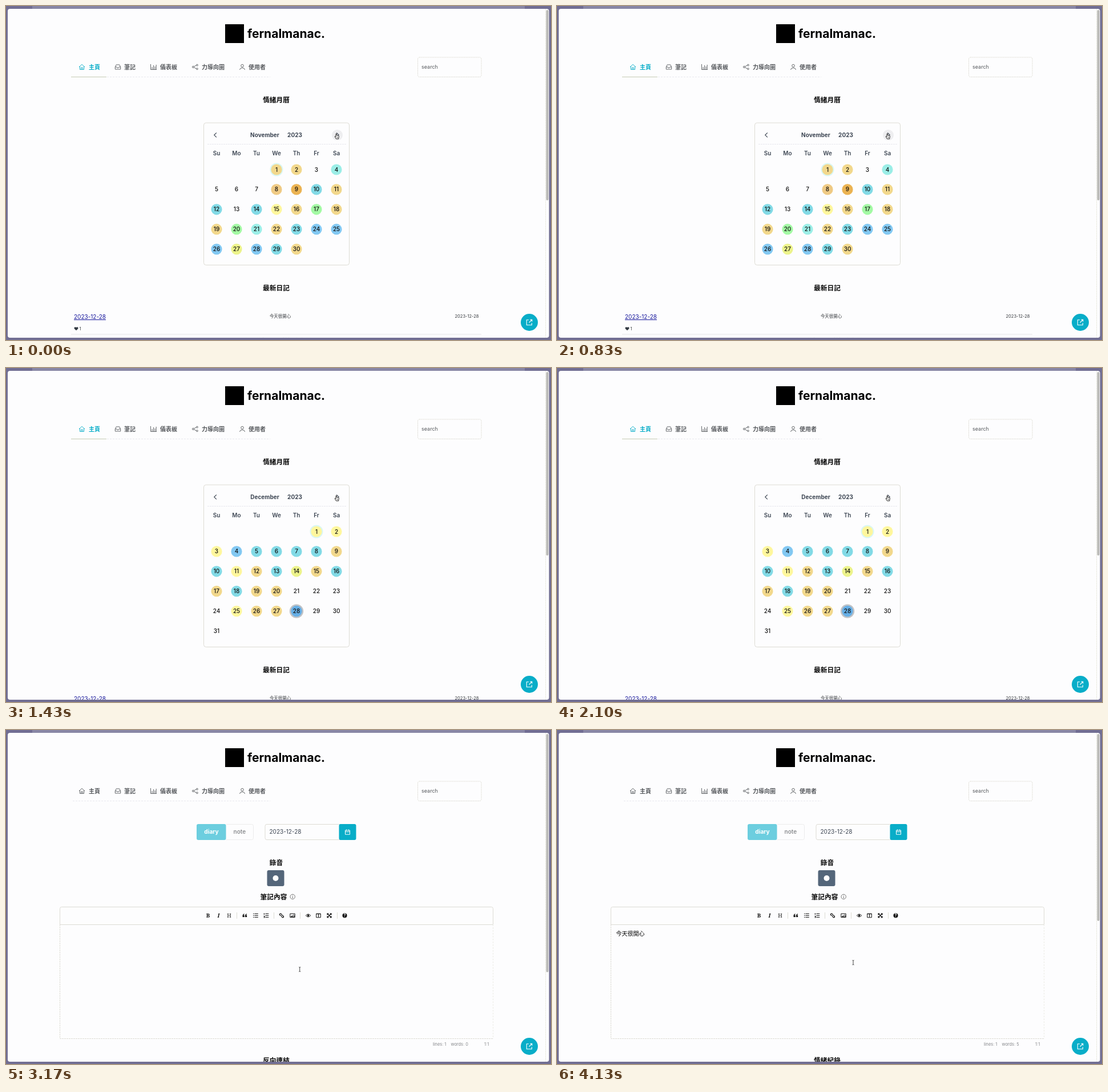
An HTML page for the animation above (4160 ms loop, 955 by 586 pixels).

```html
<!DOCTYPE html>
<html lang="zh-Hant">
<head>
<meta charset="utf-8">
<style>
html, body { margin: 0; width: 100%; height: 100%; overflow: hidden; background: #716e93; }
svg { display: block; }
text { font-family: Inter, "Noto Sans CJK TC", "Noto Sans CJK JP", "Noto Sans CJK", sans-serif; white-space: pre; }
.serif { font-family: "Noto Serif", "Liberation Serif", serif; }
</style>
</head>
<body>
<svg width="955" height="586" viewBox="0 0 955 586">
  <defs><clipPath id="win"><rect x="3" y="5" width="948.5" height="577" rx="4"/></clipPath></defs>
  <rect width="955" height="586" fill="#716e93"/>
  <rect x="46" width="863" height="5" fill="#8987a5"/>
  <rect x="3" y="5" width="948.5" height="577" rx="4" fill="#fdfdfe"/>
  <g id="page" clip-path="url(#win)"></g>
  <g id="cursor"></g>
</svg>
<script>
const LOOP = 4160, LEAVE = 1140, DECEMBER = 1370, EDITOR = 2930, FILLED = 3380;
const TEAL = '#08adc8', INK = '#3d4653', GREY = '#55585c', EDGE = '#dddcd4', FAINT = '#e8e8ee';
const page = document.getElementById('page'), cursor = document.getElementById('cursor');

const text = (x, y, s, size, fill = '#111', more = '') =>
  `<text x="${x}" y="${y}" font-size="${size}" fill="${fill}" ${more}>${s}</text>`;
const mid = (x, y, s, size, fill, weight = 400) =>
  text(x, y, s, size, fill, `text-anchor="middle" font-weight="${weight}"`);
const heading = (y, s) => mid(473.5, y, s, 11.7, '#080808', 700);
const box = (x, y, w, h, fill, more = '') =>
  `<rect x="${x}" y="${y}" width="${w}" height="${h}" fill="${fill}" ${more}/>`;
const disc = (x, y, r, fill) => `<circle cx="${x}" cy="${y}" r="${r}" fill="${fill}"/>`;
const line = (d, stroke, width = 1, fill = 'none', more = '') =>
  `<path d="${d}" fill="${fill}" stroke="${stroke}" stroke-width="${width}" ${more}/>`;
const at = (x, y, s) => `<g transform="translate(${x} ${y})">${s}</g>`;
const framed = (x, y, w, h, more = 'rx="3"') => box(x, y, w, h, 'none', `stroke="${EDGE}" ${more}`);

// Navigation icons, each drawn around its own centre
const NAV = [
  [133, 145, '主頁', 'M-5 0L0 -4.5L5 0M-3.6 -1V4.4H3.6V-1M-1.2 4.4V1H1.2V4.4'],
  [196, 207, '筆記', 'M-4.7 0L-2.7 -4H2.7L4.7 0V4H-4.7ZM-4.7 0H-1.8Q-1.5 1.7 0 1.7T1.8 0H4.7'],
  [258.5, 270, '儀表板', 'M-5 -5V4.5H5.5M-2.5 4V0M0 4V-3M2.5 4V-1M4.7 4V-4'],
  [331.5, 343, '力導向圖', 'M-2 -.8L2 -3M-2 .8L2 3M-5 0a1.5 1.5 0 1 0 3 0a1.5 1.5 0 1 0 -3 0M2 -3.3a1.4 1.4 0 1 0 2.8 0a1.4 1.4 0 1 0 -2.8 0M2 3.3a1.4 1.4 0 1 0 2.8 0a1.4 1.4 0 1 0 -2.8 0'],
  [414, 425, '使用者', 'M-2.3 -2.2a2.3 2.3 0 1 0 4.6 0a2.3 2.3 0 1 0 -4.6 0M-4.5 5Q-4.2 1.5 0 1.5T4.5 5'],
];

function shell(home) {
  const nav = NAV.map(([ix, tx, label, d], i) => {
    const color = home && !i ? TEAL : GREY;
    return at(ix, 107, line(d, color, .9)) + text(tx, 110.7, label, 10, color, 'font-weight="700"');
  }).join('');
  return box(384, 32, 33, 33, '#000') +
    text(423, 56, 'fernalmanac.', 21, '#000', 'font-weight="700"') +
    nav + line('M117 124.5H463', FAINT, 1, 'none', 'stroke-dasharray="3 2"') +
    (home ? line('M114 124.5H176', '#c5cbb4') : '') +
    framed(721.5, 90, 111.5, 34.5, 'rx="3" stroke-dasharray="2 1"') +
    text(728, 110.3, 'search', 9, GREY);
}

function frameParts(thumbEnd) {
  return line('M945.5 5V582', '#e6e6d9', 1, 'none', 'stroke-dasharray="2 1"') +
    box(946.5, 7, 4, thumbEnd - 7, '#b9b9b6', 'rx="2"') +
    disc(917, 555, 15, TEAL) +
    at(917, 555, line('M-1 -4.3H-4.7V4.7H4.3V1M1.3 -4.7H4.7V-1.3M4.5 -4.5L-.5 .5', '#fff', 1.1));
}

const MOODS = { o: '#f2d88c', O: '#ebb352', p: '#efca84', c: '#82dae6', a: '#9beee7',
  y: '#fff79d', g: '#a3faa4', l: '#ecf38b', b: '#82c8f2' };
const MONTHS = {
  November: { first: 3, days: 'oo-a---pOcoc-cyogoogaocbbblbco'.replace('bbblbco', 'bbblbco') },
  December: { first: 5, days: 'yyybccccocyoclococoo----yoob---' },
};

function calendar(name, hover) {
  const { first, days } = MONTHS[name];
  const nov = name === 'November';
  let s = framed(346.5, 205, 255, nov ? 249.5 : 284.5, 'rx="4"') +
    line('M353 242.5H596', FAINT, 1, 'none', 'stroke-dasharray="3 1"') +
    (nov ? disc(580.5, 226.5, 9.5, '#eeeef0') : '') +
    line('M368.8 222.3L364.8 226.3L368.8 230.3M579.2 222.3L583.2 226.3L579.2 230.3', INK, 1.2) +
    mid(453.5, 229.8, name, 10, INK, 700) + mid(506, 229.8, '2023', 10, INK, 700);
  ['Su', 'Mo', 'Tu', 'We', 'Th', 'Fr', 'Sa'].forEach((d, i) => s += mid(369 + 35 * i, 262, d, 10, INK, 600));
  [...days].forEach((mood, i) => {
    const cell = i + first, x = 369 + cell % 7 * 35, y = 287 + Math.floor(cell / 7) * 34.9;
    const chosen = !nov && i === 27;
    if (!i) s += disc(x, y, 11.5, '#d9f6f4');
    if (chosen) s += disc(x, y, 12.2, '#bfc2c7');
    if (mood !== '-') s += disc(x, y, 9.6, chosen ? '#66afe6' : MOODS[mood]);
    else if (cell === hover) s += disc(x, y, 11.7, '#efeff1');
    s += mid(x, y + 3.5, i + 1, 10, '#111', 500);
  });
  return s;
}

const ENTRIES = [
  ['28', '今天很開心', 1],
  ['27', '今天開始寫履歷了，對未來充滿希望！', 8],
  ['26', '心情很好聽 [[NumCrest School]] [[小葉]]', 8],
  ['25', '應該沒壞掉吧 [[個人專案]] 拜託不要壞掉', 7],
  ['20', '今天是在 [[NumCrest School]] 很重要的日子，很開心可以完成 Fern alman...', 8],
];
const HEART = 'M0 3.3L-3.2 .2C-4.4 -1.8 -1.7 -4 0 -1.8C1.7 -4 4.4 -1.8 3.2 .2Z';

function diaryList(shift) {
  const rows = ENTRIES.map(([day, note, likes], i) => {
    const date = '2023-12-' + day;
    return at(0, 42 * i,
      text(119, 299, date, 10, i === 2 ? '#4a1c82' : '#17179c', 'text-decoration="underline"') +
      mid(480.5, 297.2, note, 7.45, '#33363a') +
      text(828.5, 297, date, 7.5, '#33363a', 'text-anchor="end"') +
      at(123, 316, line(HEART, 'none', 0, '#333a42')) + text(128.5, 318.8, likes, 7.5, '#33363a') +
      line('M114 326H833', i === 4 ? '#dcddd0' : '#e5e5e6'));
  }).join('');
  return at(0, shift, heading(249, '最新日記') + rows + heading(538, '最新筆記') +
    mid(469.5, 586.5, '今天學習到很多新的東西，希望明天也可以繼續加油下去', 7.45, '#33363a') +
    text(828.5, 586.5, '2023-12-14', 7.5, '#33363a', 'text-anchor="end"'));
}

function toolbar() {
  const letter = (x, s, style) => text(x, 329, s, 9.5, '#111', `class="serif" text-anchor="middle" ${style}`);
  const icon = (x, d, width = 1.2, fill = 'none') => at(x, 325.5, line(d, '#111', width, fill));
  // Opening quotation mark: a round dot with a tail curling up
  const quote = 'M-3.8 .6Q-3.8 -2.4 -1.2 -2.9V-1.7Q-2.4 -1.3 -2.4 -.2H-.9V2.6H-3.8Z';
  return letter(354, 'B', 'font-weight="700"') + letter(372.5, 'I', 'font-style="italic" font-weight="600"') +
    letter(391, 'H', '') +
    line('M404.5 320V331M469.5 320V331M515.5 320V331M580.5 320V331', EDGE) +
    icon(418.5, quote, .3, '#111') + icon(422.9, quote, .3, '#111') +
    icon(437.5, 'M-4.5 -3H-3M-4.5 0H-3M-4.5 3H-3M-2 -3H4.3M-2 0H4.3M-2 3H4.3') +
    icon(456, 'M-3.6 -4V-1.5M-4.5 1H-3V3.5H-4.5M-1.5 -3H4.3M-1.5 0H4.3M-1.5 3H4.3') +
    icon(483, 'M-.3 .8L-3.4 -.8V-2.8L-1.5 -3.4L.8 -1.2M.3 -.6L3.4 1V3L1.6 3.5L-.6 1.4') +
    icon(502, 'M-4.2 -3.2H4.2V3.2H-4.2ZM-3 2.2L-1 .2L0 1L2 -1.2L3.3 .5V2.2Z', 1) +
    icon(529.5, 'M-4.2 0Q0 -5 4.2 0Q0 5 -4.2 0Z', 1) + disc(529.5, 325.5, 1.7, '#111') +
    icon(547.5, 'M-3.8 -3.2H3.8V3.4H-3.8ZM0 -3V3M-3.8 -2.8H3.8', 1) +
    icon(566.5, 'M-3 -3L3 3M3 -3L-3 3M-3.5 -1V-3.5H-1M1 -3.5H3.5V-1M3.5 1V3.5H1M-1 3.5H-3.5V1') +
    disc(593.5, 325.5, 4, '#111') + mid(593.5, 328.1, '?', 7, '#fff', 700);
}

function editor(filled) {
  return box(334, 165, 51.5, 28, '#6ccedf', 'rx="3"') + mid(360, 182.4, 'diary', 10.2, '#fff', 700) +
    line('M385.5 165.5H430.5Q433.5 165.5 433.5 168.5V189.5Q433.5 192.5 430.5 192.5H385.5', '#ececec') +
    mid(409.3, 182.2, 'note', 10, '#8b8d90', 600) +
    framed(454, 165.5, 135, 27) + text(461.5, 182.3, '2023-12-28', 10, INK) +
    box(583.5, 165, 30, 28, TEAL, 'rx="3"') +
    at(598.5, 179, line('M-4 -3H4V4.2H-4ZM-4 -.4H4M-2 -4.5V-2M2 -4.5V-2', '#fff', 1)) +
    heading(237, '錄音') + box(457.5, 246, 30, 28, '#54667a', 'rx="3"') + disc(472.5, 260, 5, '#fff') +
    mid(469, 296.7, '筆記內容', 11.7, '#080808', 700) +
    `<circle cx="502.2" cy="292.5" r="4.2" fill="none" stroke="#555" stroke-width=".8"/>` +
    line('M502.2 291.8V295M502.2 289.9V290.8', '#555', .9) +
    line('M94.5 341.5V313.5Q94.5 310.5 97.5 310.5H850.5Q853.5 310.5 853.5 313.5V341.5Z', EDGE) +
    line('M94.5 341V541.5H853.5', EDGE, 1, 'none', 'stroke-dasharray="3 1"') +
    line('M853.5 341V541.5', '#ebebe6', 1, 'none', 'stroke-dasharray="3 2"') +
    toolbar() + (filled ? text(103.5, 360.5, '今天很開心', 10, '#000', 'font-weight="500"') : '') +
    text(748, 554, 'lines: 1', 7.4, '#85878a') +
    text(779.5, 554, 'words: ' + (filled ? 5 : 0), 7.4, '#85878a') + text(838, 554, '1:1', 7.4, '#85878a') +
    heading(584, filled ? '情緒紀錄' : '反向連結');
}

const POINTERS = {
  arrow: line('M-1 -4.5V3.8L.9 2.2L2.1 4.9L3.4 4.3L2.2 1.7H4.4Z', '#fff', .5, '#000'),
  hand: line('M-1.8 -4.2Q-1 -5.2 -.3 -4.2V-1.6L2.6 -.9Q3.8 -.5 3.7 .8L3 3V4.6H-1.3L-3.6 .8Q-3.6 -.3 -2.6 .1L-1.8 1Z', '#111', .9, '#fff') +
    line('M.2 1V3M1.6 1V3', '#111', .6),
  beam: line('M-1.5 -4Q0 -4 0 -3V3Q0 4 -1.5 4M1.5 -4Q0 -4 0 -3M1.5 4Q0 4 0 3', '#333', .9),
};
// Pointer path: time, x, y
const PATH = [[0, 579.8, 228.5], [2180, 579.8, 228.5], [2670, 535.7, 403], [2830, 512, 424.5],
  [2990, 512, 424.5], [3170, 514.7, 420], [3420, 519, 408], [LOOP, 519, 408]];

function pointerAt(t) {
  const i = PATH.findIndex(p => p[0] > t), [t0, x0, y0] = PATH[i - 1], [t1, x1, y1] = PATH[i];
  const k = (t - t0) / (t1 - t0);
  return [x0 + (x1 - x0) * k, y0 + (y1 - y0) * k];
}

function scene(kind, hover) {
  switch (kind) {
    case 'november': return shell(true) + heading(169, '情緒月曆') + calendar('November') + diaryList(250) + frameParts(341);
    case 'loading': return shell(true) + heading(169, '情緒月曆') + diaryList(0) + frameParts(456);
    case 'december': return shell(true) + heading(169, '情緒月曆') + calendar('December', hover) + diaryList(285) + frameParts(329);
    case 'empty': return shell(false) + editor(false) + frameParts(425);
    default: return shell(false) + editor(true) + frameParts(335);
  }
}

let shown = '';
const start = performance.now();
function draw(now) {
  const t = Math.max(0, now - start) % LOOP;
  const kind = t < LEAVE ? 'november' : t < DECEMBER ? 'loading' : t < EDITOR ? 'december' : t < FILLED ? 'empty' : 'filled';
  const [x, y] = pointerAt(t);
  const row = Math.floor((y - 4 - 269.5) / 34.9), col = Math.floor((x - 1 - 351.5) / 35);
  const hover = kind === 'december' && row >= 0 ? row * 7 + col : -1;
  const key = kind + hover;
  if (key !== shown) {
    page.innerHTML = scene(kind, hover);
    shown = key;
  }
  const gap = kind === 'december' && y > 240 && row < 0;
  const pointer = t >= EDITOR ? 'beam' : kind === 'loading' || gap ? 'arrow' : 'hand';
  cursor.innerHTML = at(x, y, POINTERS[pointer]);
  requestAnimationFrame(draw);
}
draw(start);
</script>
</body>
</html>
```
